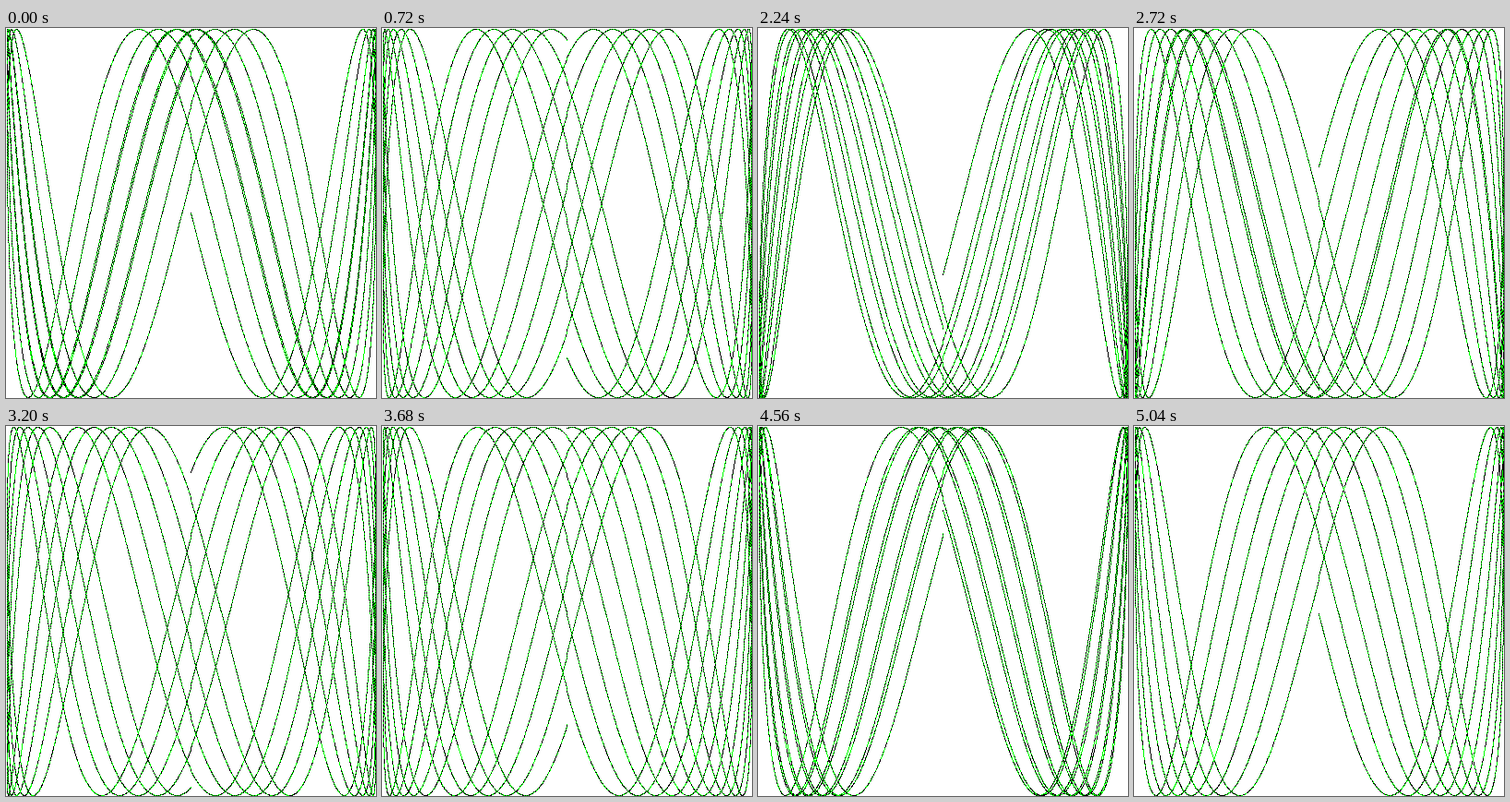
Write an HTML page with a canvas that moves like this. It is 401 px wide and 401 px high and loops after 5.12 s.

```html
<!DOCTYPE html>
<html>
<head>
<meta charset="utf-8">
<title>Lissajous</title>
<style>
html, body { margin: 0; width: 100%; height: 100%; overflow: hidden; background: #fff; }
canvas { display: block; }
</style>
</head>
<body>
<canvas id="stage" width="401" height="401"></canvas>
<script>
const SIZE = 200, WIDTH = 2 * SIZE + 1;
const CYCLES = 5, RES = 0.001, FREQ = 3.9326;
const FRAMES = 64, DELAY = 80, PHASE_STEP = 0.1;
const WHITE = 0xffffffff, BLACK = 0xff000000, GREEN = 0xff00ff00;

const ctx = document.getElementById('stage').getContext('2d');
const image = ctx.createImageData(WIDTH, WIDTH);
const pixels = new Uint32Array(image.data.buffer);
const toPixel = v => SIZE + Math.trunc(v * SIZE + 0.5);

function draw(phase) {
  pixels.fill(WHITE);
  const steps = CYCLES * 2 * Math.PI / RES;
  for (let i = 0; i < steps; i++) {
    const t = i * RES;
    const x = toPixel(Math.sin(t));
    const y = toPixel(Math.sin(t * FREQ + phase));
    pixels[y * WIDTH + x] = i % 2 ? GREEN : BLACK;
  }
  ctx.putImageData(image, 0, 0);
}

const start = performance.now();
let shown = -1;
function tick() {
  const frame = Math.floor((performance.now() - start) / DELAY) % FRAMES;
  if (frame !== shown) draw((shown = frame) * PHASE_STEP);
  requestAnimationFrame(tick);
}
tick();
</script>
</body>
</html>
```
